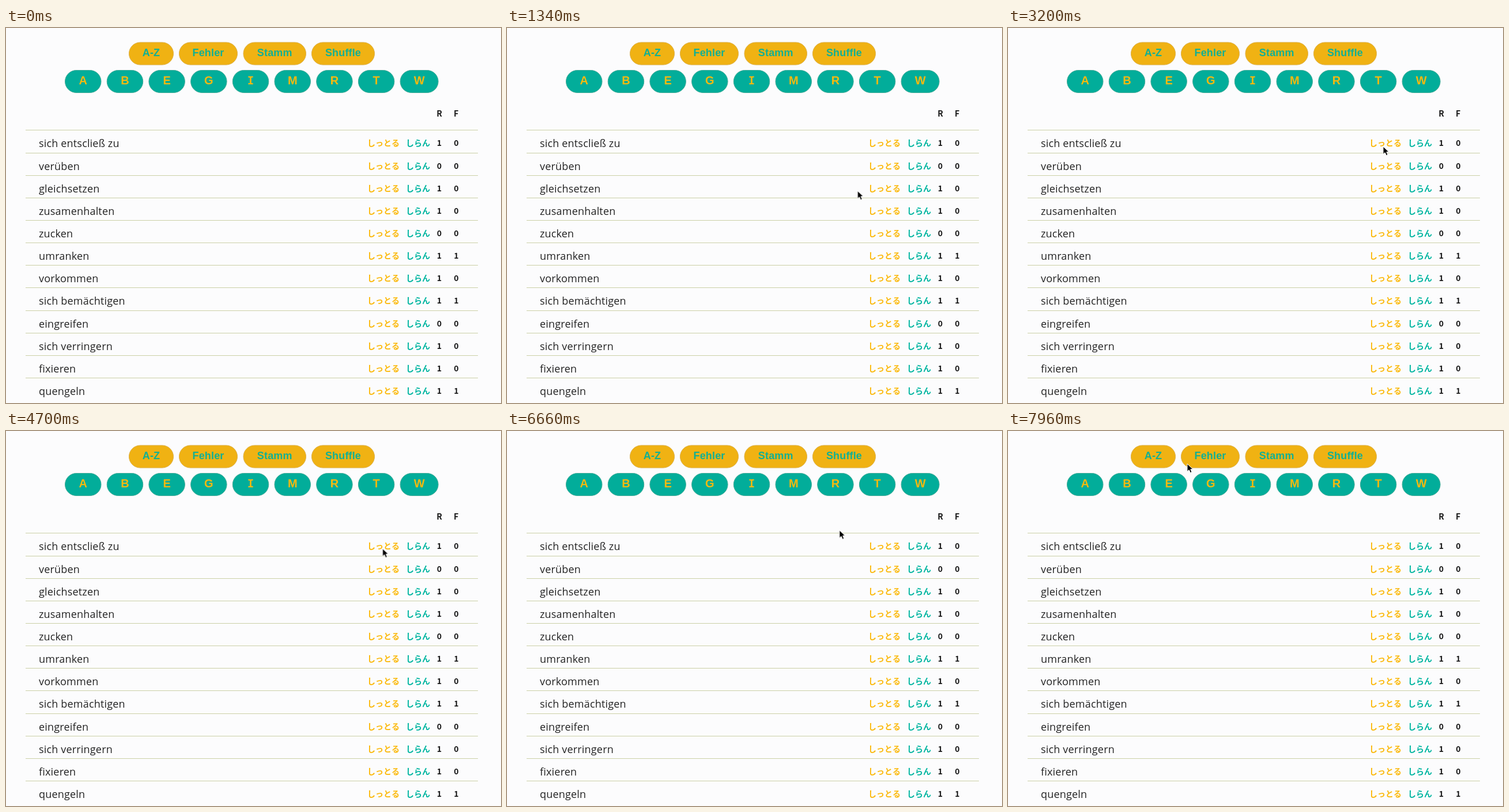
These frames come from a looping animation (859x652 px, 8000 ms). An HTML page:

```html
<!DOCTYPE html>
<html lang="de">
<head>
<meta charset="utf-8">
<title>Vokabelliste</title>
<style>
  html, body { margin: 0; width: 100%; height: 100%; overflow: hidden; background: #fcfcfd; }
  svg { display: block; width: 100%; height: 100%; }
  .btn { font: 700 18px "Liberation Sans", Arial, sans-serif; letter-spacing: .15px; text-anchor: middle; }
  .letter { font-size: 20px; letter-spacing: 0; }
  .slab { font-family: "Noto Sans Mono", monospace; }
  .word { font: 400 18px "Open Sans", sans-serif; letter-spacing: .18px; fill: #222; }
  .kana, .num { font: 700 14px "Noto Sans CJK JP", "Noto Sans CJK", sans-serif; }
  .num { fill: #161616; text-anchor: middle; }
  .rule { fill: #cbd0a6; }
</style>
</head>
<body>
<svg id="stage" viewBox="0 0 859 652" xmlns="http://www.w3.org/2000/svg"></svg>
<script>
const NS = "http://www.w3.org/2000/svg";
const LOOP = 8000;
const YELLOW = "#fbb90c", TEAL = "#00b5a0";
const stage = document.getElementById("stage");

function add(tag, attrs, text, parent = stage) {
  const el = document.createElementNS(NS, tag);
  for (const key in attrs) el.setAttribute(key, attrs[key]);
  if (text !== undefined) el.textContent = text;
  parent.append(el);
  return el;
}

function pill(label, x, y, width, colors, cls, baseline) {
  add("rect", { x: x + .5, y: y + .5, width: width - 1, height: 39, rx: 19.5, fill: colors.fill, stroke: colors.edge });
  add("text", { x: x + width / 2, y: baseline, class: cls, fill: colors.text }, label);
}

const sortColors = { fill: "#f0b213", edge: "#dcae45", text: "#12b093" };
const letterColors = { fill: "#02ad9a", edge: "#45ab98", text: "#f6b90f" };

[["A-Z", 213, 78], ["Fehler", 300, 102], ["Stamm", 411.5, 109.5], ["Shuffle", 530, 110]]
  .forEach(([label, x, w]) => pill(label, x, 24.5, w, sortColors, "btn", 49));

[..."ABEGIMRTW"].forEach((label, i) => {
  const x = 102 + i * 72.7;
  const cls = "btn letter" + (label === "I" ? " slab" : "");
  pill(label, x, 73, label === "W" ? 67 : 63.5, letterColors, cls, 98);
});

add("text", { x: 752, y: 154, class: "num" }, "R");
add("text", { x: 781, y: 154, class: "num" }, "F");

// word, right answers, wrong answers
const rows = [
  ["sich entscließ zu", 1, 0], ["verüben", 0, 0], ["gleichsetzen", 1, 0],
  ["zusamenhalten", 1, 0], ["zucken", 0, 0], ["umranken", 1, 1],
  ["vorkommen", 1, 0], ["sich bemächtigen", 1, 1], ["eingreifen", 0, 0],
  ["sich verringern", 1, 0], ["fixieren", 1, 0], ["quengeln", 1, 1]
];
rows.forEach(([word, right, wrong], i) => {
  const top = Math.round(177.4 + i * 39.15);
  add("rect", { x: 34, y: top, width: 785, height: 1, class: "rule" });
  add("text", { x: 57, y: top + 30, class: "word" }, word);
  add("text", { x: 627, y: top + 28, class: "kana", fill: YELLOW }, "しっとる");
  add("text", { x: 694, y: top + 28, class: "kana", fill: TEAL }, "しらん");
  add("text", { x: 752, y: top + 28, class: "num" }, right);
  add("text", { x: 781.5, y: top + 28, class: "num" }, wrong);
});

const pointer = add("g", {});
add("path", {
  d: "M0 0V13.5L3.2 10.6L5.4 15.6L8 14.5L5.8 9.6H10Z",
  fill: "#000", stroke: "#fff", "stroke-width": 1, "stroke-linejoin": "round"
}, undefined, pointer);

// time in ms, x, y, easing towards the next step
const path = [
  [0, 606, 290, "linear"],
  [1300, 606, 290, "ease-out"],
  [1940, 628.5, 225, "ease-in-out"],
  [2700, 651, 206, "linear"],
  [3200, 651, 206, "ease-out"],
  [3500, 653.5, 204.5, "linear"],
  [6300, 653.5, 204.5, "ease-in-out"],
  [7260, 393, 96, "ease-in-out"],
  [7920, 311, 57, "linear"],
  [LOOP, 311, 57, "linear"]
];
const timing = { duration: LOOP, iterations: Infinity };
pointer.animate(path.map(([time, x, y, easing]) => (
  { offset: time / LOOP, transform: `translate(${x}px, ${y}px)`, easing }
)), timing);
pointer.animate([
  { offset: 0, opacity: 0, easing: "step-end" },
  { offset: 1300 / LOOP, opacity: 1 },
  { offset: 1, opacity: 1 }
], timing);
</script>
</body>
</html>
```
